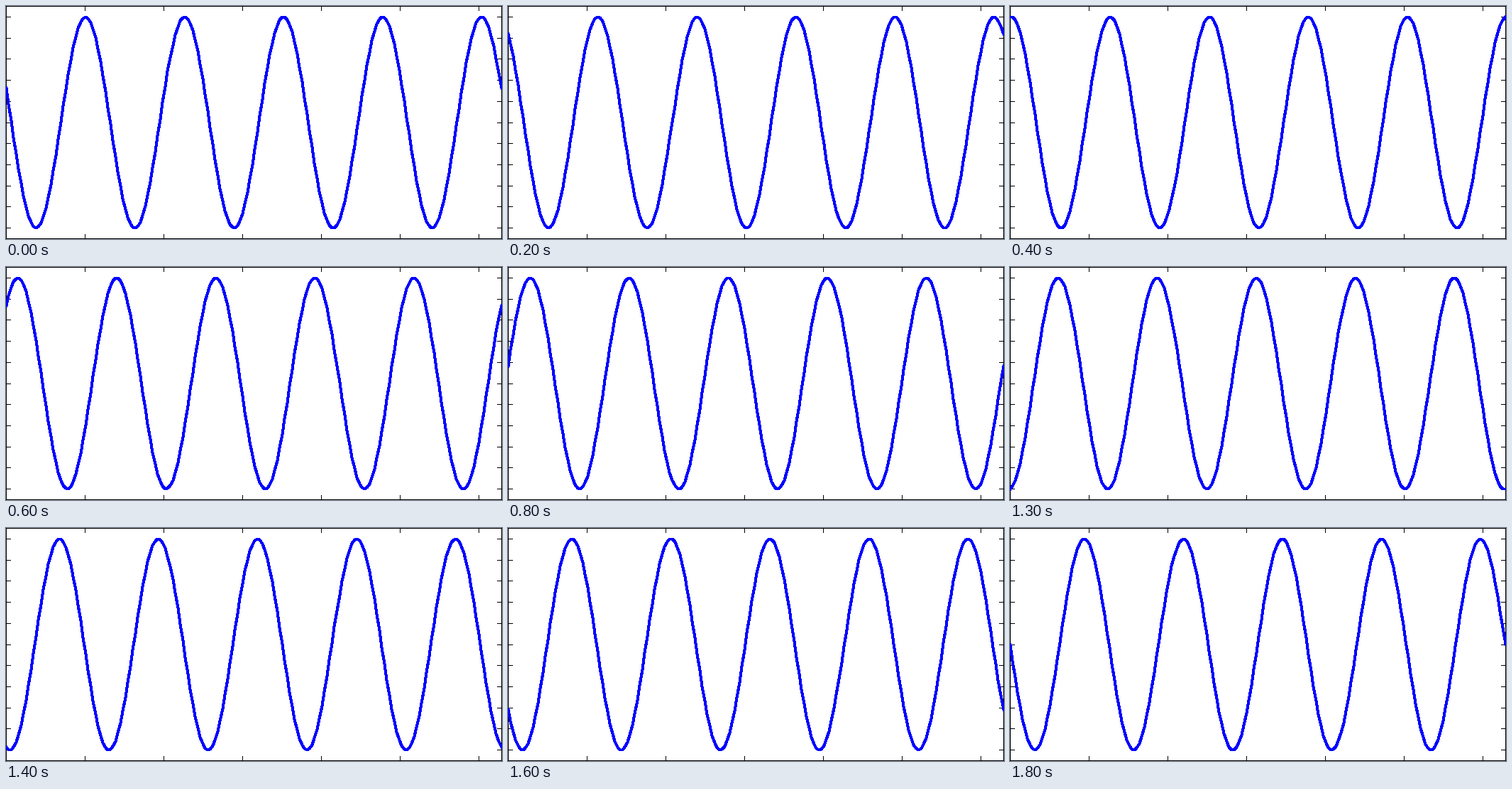
These frames come from a looping animation (699x328 px, 1.9 s). A matplotlib script:

```python
import numpy as np
import matplotlib.pyplot as plt
from matplotlib.animation import FuncAnimation
from matplotlib.patches import Rectangle

W, H, DPI = 699, 328, 64
FRAMES, INTERVAL = 19, 100
TICK = 7
PX = 72 / DPI  # one pixel in points

fig = plt.figure(figsize=(W / DPI, H / DPI), dpi=DPI, facecolor="white")
ax = fig.add_axes([0, 0, 1, 1])
ax.set_xlim(0, W)
ax.set_ylim(H, 0)
ax.axis("off")


def to_col(x):
    return np.floor(x / (2 * np.pi) * (W - 1))


def to_row(y):
    return np.round((1.1 - y) / 2.2 * (H - 1))


def bar(x, y, w, h):
    ax.add_patch(Rectangle((x, y), w, h, facecolor="black", linewidth=0))


# Box around the plot
for col in (0, W - 1):
    bar(col, 0, 1, H)
for row in (0, H - 1):
    bar(0, row, W, 1)

# Inward ticks on all four sides
for value in range(1, 7):
    for row in (0, H - TICK):
        bar(to_col(value), row, 1, TICK)
for value in np.linspace(-1, 1, 11):
    for col in (0, W - TICK):
        bar(col, to_row(value), TICK, 1)

# Vertices sit on whole pixels, which gives the line its slight roughness
x = np.linspace(0, 2 * np.pi, 200)
wave, = ax.plot([], [], color="#0000ff", lw=3 * PX, antialiased=False,
                solid_joinstyle="round", solid_capstyle="projecting",
                snap=False, zorder=5)


def update(i):
    phase = 2 * np.pi * (i + 1) / FRAMES
    wave.set_data(to_col(x) + 0.5, to_row(-np.sin(5 * x - phase)) + 0.5)
    return wave,


anim = FuncAnimation(fig, update, frames=FRAMES, interval=INTERVAL,
                     repeat=True, repeat_delay=0)
plt.show()
```
